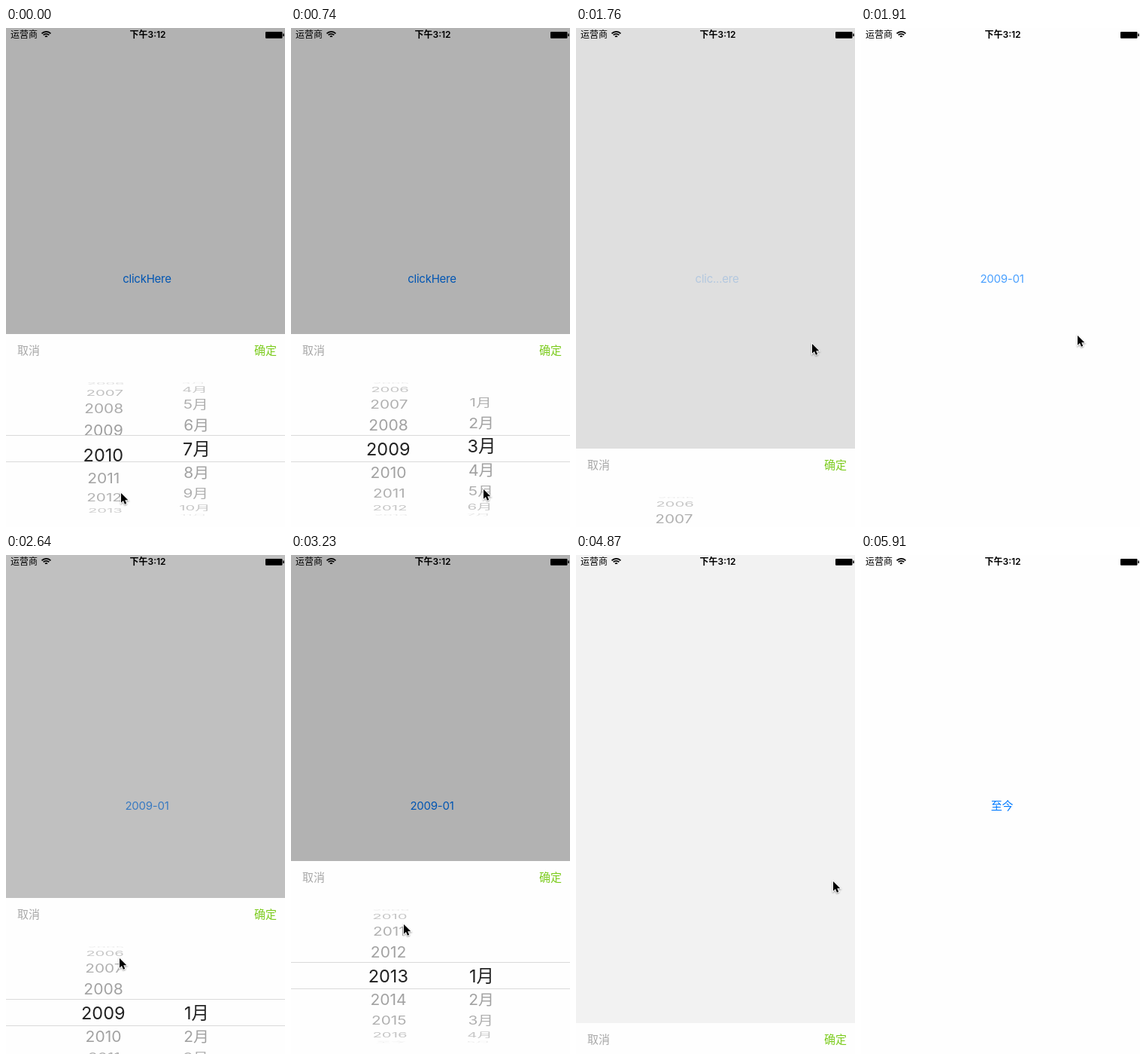
Write an HTML page with a canvas that moves like this. It is 371x662 px and loops after 6.44 s.

```html
<!DOCTYPE html>
<html lang="zh-CN">
<head>
<meta charset="utf-8">
<title>Date picker</title>
<style>
  html, body { margin: 0; width: 100%; height: 100%; overflow: hidden; background: #fefefe; }
  canvas { display: block; }
</style>
</head>
<body>
<canvas id="stage" width="371" height="662"></canvas>
<script>
const ctx = document.getElementById('stage').getContext('2d');
const W = 371, H = 662, LOOP = 6440, STEP = 147.2;
const MID = 187.5, SHEET_TOP = 406, SHEET_H = 256, SLIDE = 2.04;
const FONT = 'Inter, "Noto Sans CJK SC", "Noto Sans CJK", sans-serif';
const RADIUS = 88, ROW_ANGLE = 21 * Math.PI / 180, ZOOM = 0.9;
const NOW = 2017; // the wheel row after the last year

// Pointer moves: start step, end step, x, y
const moves = [
  [0, 2, 245, 500], [2, 5, 256, 612], [5, 9.3, 340, 430], [11, 13, 288, 408],
  [13, 16, 190, 338], [16, 18, 151, 535], [18, 20, 142, 620], [20, 22, 150, 490],
  [23, 27, 308, 490], [28, 30, 342, 433], [33, 36, 327, 601], [36, 40, 316, 690]
];
const titles = [[0, 'clickHere'], [11, 'clic...ere'], [13, '2009-01'], [31, ''], [34, '至今']];

// Smooth 0 to 1 between two steps
function ramp(step, from, to) {
  const p = Math.min(1, Math.max(0, (step - from) / (to - from)));
  return p * p * (3 - 2 * p);
}

const slide = (step, from) => ramp(step, from, from + SLIDE);
const sheetHidden = step => slide(step, 10.85) - slide(step, 16.53) + slide(step, 31.48);
const yearAt = step => 2009 + 0.77 * (1 - ramp(step, -1, 2)) / (1 - ramp(0, -1, 2)) + 8 * ramp(step, 19, 25);
const monthAt = step => 7 - 6 * ramp(step, 2, 7);

function text(str, x, y, size, color, align = 'center', weight = 400) {
  ctx.font = `${weight} ${size}px ${FONT}`;
  ctx.textAlign = align;
  ctx.fillStyle = color;
  ctx.fillText(str, x, y + size * 0.36);
}

function clipped(y, h, draw) {
  ctx.save();
  ctx.beginPath();
  ctx.rect(0, y, W, h);
  ctx.clip();
  draw();
  ctx.restore();
}

function drawStatusBar() {
  text('运营商', 6, 9, 12, '#000', 'left');
  text('下午3:12', 188.5, 9, 12, '#000', 'center', 600);
  ctx.strokeStyle = '#000';
  ctx.lineWidth = 1.7;
  for (const r of [8.2, 5.2, 2]) {
    ctx.beginPath();
    ctx.arc(53.5, 13, r, -Math.PI * 0.76, -Math.PI * 0.24);
    ctx.stroke();
  }
  ctx.beginPath();
  ctx.roundRect(345, 5, 22.5, 8.7, 1);
  ctx.rect(368.3, 7.5, 1.5, 3.5);
  ctx.fill();
}

function drawTitle(step) {
  const label = titles.findLast(([from]) => step >= from)[1];
  const touched = step < 17 ? 12 : 17; // a touched button dims, then fades back
  ctx.globalAlpha = step < 12 ? 1 : 0.2 + 0.8 * ramp(step, touched, touched + 1.7);
  ctx.letterSpacing = '-0.24px';
  text(label, MID, 333, 15, '#007aff');
  ctx.letterSpacing = '0px';
  ctx.globalAlpha = 1;
}

function drawRows(x, cy, pos, first, last, label, selected) {
  const lens = selected ? 1 / ZOOM : 1;
  for (let row = Math.max(first, Math.ceil(pos - 4.2)); row <= Math.min(last, pos + 4.2); row++) {
    const angle = (row - pos) * ROW_ANGLE, depth = Math.cos(angle);
    if (depth <= 0.02) continue;
    const near = 0.93 + 0.07 * depth, scale = ZOOM * near * lens;
    ctx.save();
    ctx.translate(MID + (x - MID) * near, cy + RADIUS * Math.sin(angle) * lens);
    ctx.scale(scale, scale * depth);
    if (!selected) ctx.globalAlpha = depth ** 0.7;
    text(label(row), 0, 0, 23.5, selected ? '#222' : '#9c9c9c');
    ctx.restore();
  }
}

function drawWheel(top, ...wheel) {
  const [x, pos, first, last, label] = wheel;
  const rows = selected => () => drawRows(x, top + 152.5, pos, first, last, label, selected);
  clipped(top + 62, 72, rows(false));
  clipped(top + 170, 72, rows(false));
  clipped(top + 135, 34, rows(true));
}

function drawSheet(step, top) {
  ctx.fillStyle = '#fefefe';
  ctx.fillRect(0, top, W, H);
  text('取消', 15, top + 22, 15, '#a8a8a8', 'left');
  text('确定', 360, top + 22, 15, '#7bcb1c', 'right');
  drawWheel(top, 129.3, yearAt(step), 1970, NOW, y => y === NOW ? '至今' : String(y));
  if (step < 25) drawWheel(top, 253.5, monthAt(step), 1, 12, m => m + '月');
  ctx.fillStyle = '#dadada';
  ctx.fillRect(0, top + 134, W, 1);
  ctx.fillRect(0, top + 169, W, 1);
}

function drawCursor(step) {
  let x = 153, y = 617;
  for (const [from, to, toX, toY] of moves) {
    const p = ramp(step, from, to);
    x += (toX - x) * p;
    y += (toY - y) * p;
  }
  const arrow = new Path2D('M0 0V14.3L3.3 11.2 5.5 16.3 8 15.2 5.8 10.3H10.3Z');
  ctx.save();
  ctx.translate(x, y);
  ctx.scale(0.9, 0.9);
  ctx.shadowColor = 'rgba(0,0,0,.4)';
  ctx.shadowBlur = 2;
  ctx.shadowOffsetY = 1;
  ctx.strokeStyle = '#fff';
  ctx.lineWidth = 2;
  ctx.stroke(arrow);
  ctx.shadowColor = 'transparent';
  ctx.fillStyle = '#000';
  ctx.fill(arrow);
  ctx.restore();
}

function render(now) {
  const step = Math.floor((now % LOOP) / STEP + 0.09);
  const hidden = sheetHidden(step);
  ctx.fillStyle = '#fefefe';
  ctx.fillRect(0, 0, W, H);
  drawTitle(step);
  ctx.fillStyle = `rgba(0,0,0,${0.3 * (1 - hidden)})`;
  ctx.fillRect(0, 0, W, H);
  ctx.fillStyle = '#000';
  drawStatusBar();
  if (hidden < 1) drawSheet(step, SHEET_TOP + Math.round(SHEET_H * hidden));
  drawCursor(step);
}

const start = performance.now();
function tick() {
  render(performance.now() - start);
  requestAnimationFrame(tick);
}
tick();
</script>
</body>
</html>
```
